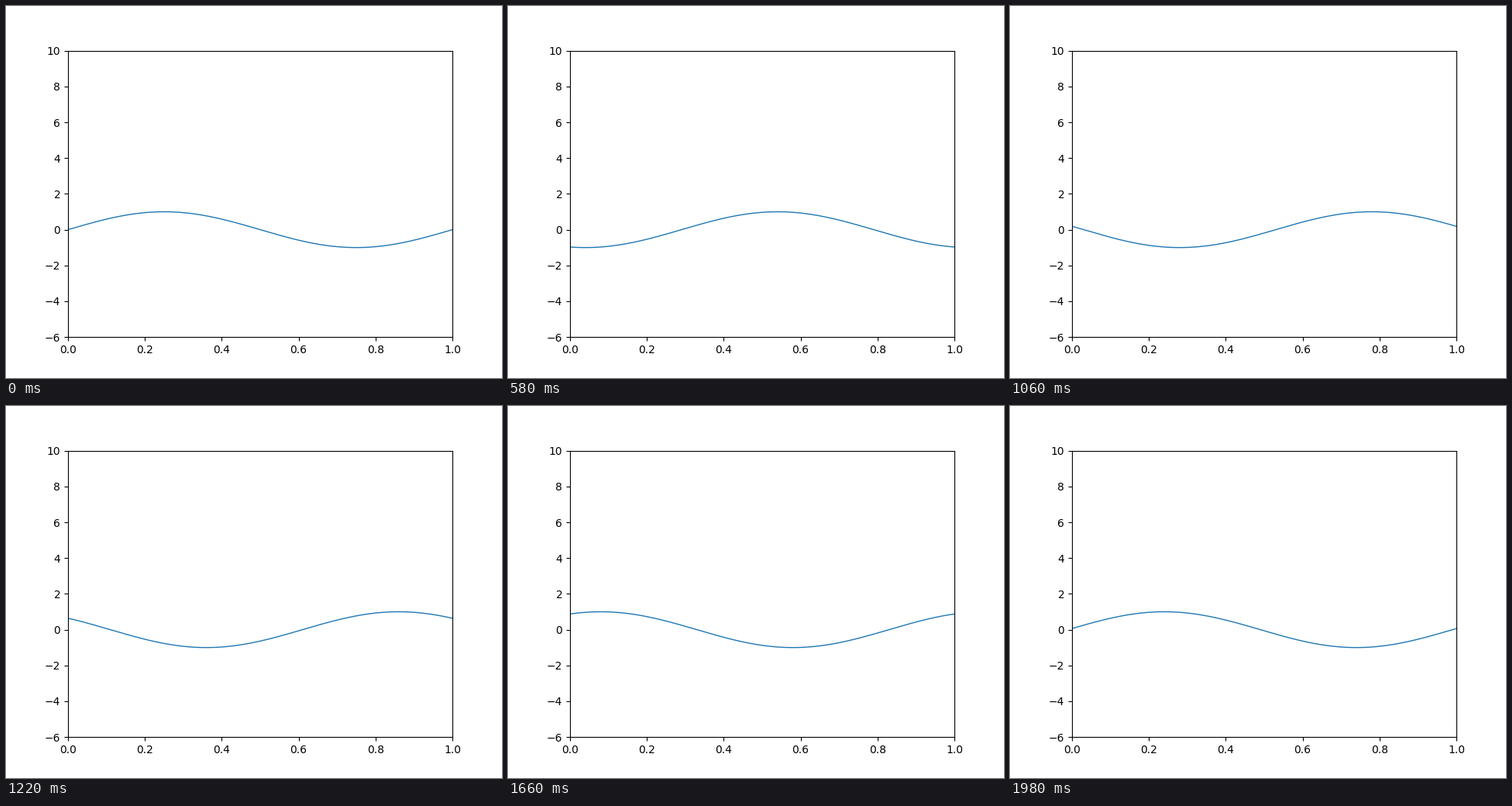
Recreate the animation shown at these times as a matplotlib script. Size 640 by 480 pixels, loop 2 s.

```python
import numpy as np
import matplotlib.pyplot as plt
from matplotlib.animation import FuncAnimation

FRAMES = 100
INTERVAL = 20  # ms

fig, ax = plt.subplots(figsize=(6.4, 4.8), dpi=100)
ax.set_xlim(0, 1)
ax.set_ylim(-6, 10)

x = np.linspace(0, 1, 1000)
line, = ax.plot([], [], lw=1)


def update(i):
    """Shift one sine period to the right, once per loop."""
    line.set_data(x, np.sin(2 * np.pi * (x - i / FRAMES)))
    return line,


anim = FuncAnimation(fig, update, frames=FRAMES, interval=INTERVAL,
                     repeat=True, repeat_delay=0)
plt.show()
```
